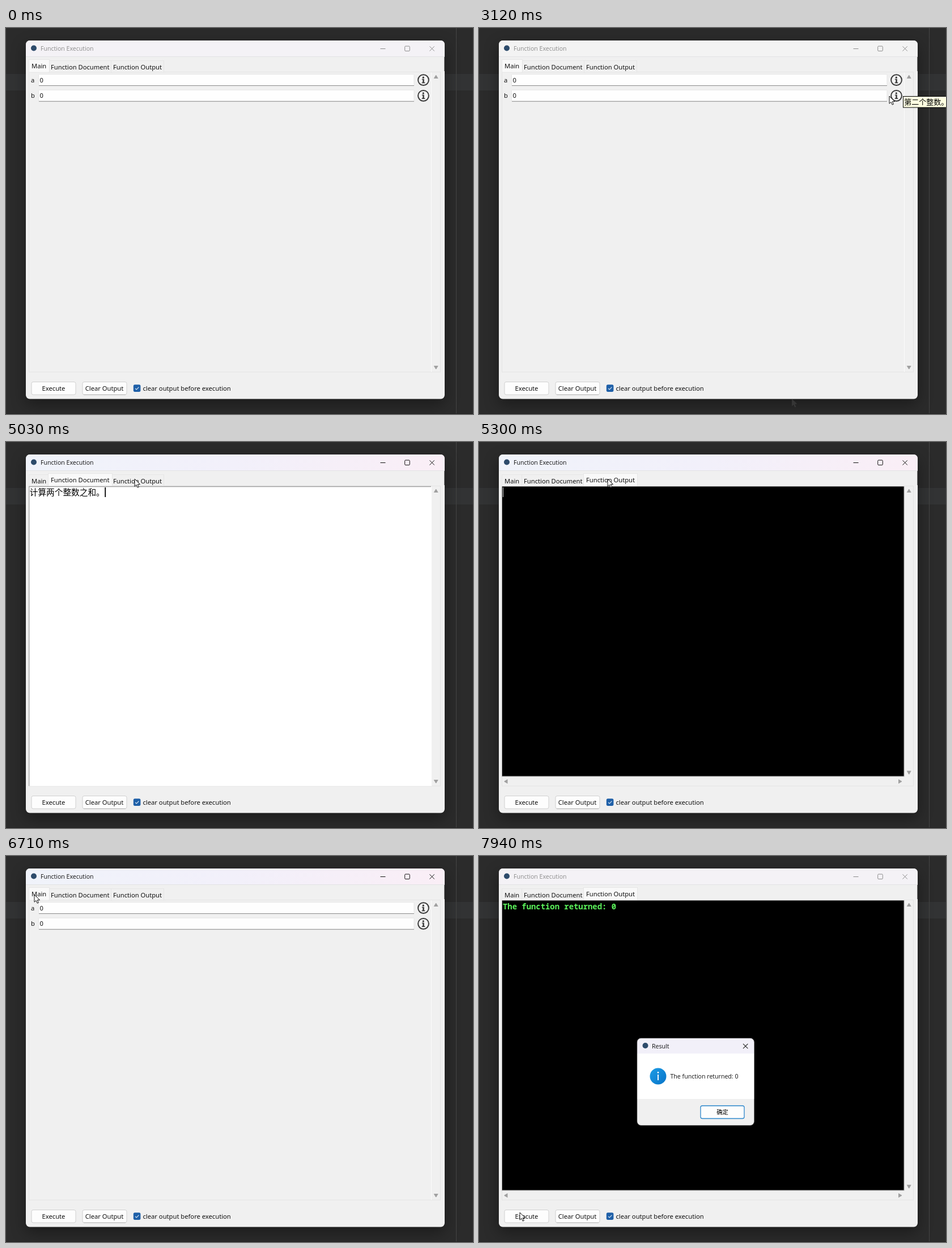
Recreate the animation shown at these times as an HTML page. Size 824 by 680 pixels, loop 8 s.

```html
<!DOCTYPE html>
<html lang="en">
<head>
<meta charset="utf-8">
<title>Function Execution</title>
<style>
html, body { margin: 0; width: 100%; height: 100%; overflow: hidden; background: #2b2b2b; }
svg { display: block; width: 824px; height: 680px; }
text { white-space: pre; }
.ui { font: 11.2px "Noto Sans", sans-serif; fill: #111; }
.cap { font: 10.6px "Open Sans", sans-serif; }
.cjk { font-family: "Noto Sans CJK SC", "Noto Sans CJK", sans-serif; fill: #000; }
.log { font: bold 13.9px "Noto Sans Mono", monospace; fill: #5cf45c; }
.win { filter: drop-shadow(0 9px 13px rgba(0, 0, 0, .38)); }
.arrow { fill: #a0a0a0; }
.line { fill: none; stroke: #e4e4e4; }
</style>
</head>
<body>
<svg viewBox="0 0 824 680">
  <defs>
    <linearGradient id="glow">
      <stop offset="0" stop-color="#f0f3fa"/>
      <stop offset=".5" stop-color="#f2f0fa"/>
      <stop offset="1" stop-color="#faeef6"/>
    </linearGradient>
    <linearGradient id="blue" x2="1" y2="1">
      <stop offset="0" stop-color="#1d9ce5"/>
      <stop offset="1" stop-color="#0874c8"/>
    </linearGradient>
    <path id="ptr" d="M0 0V13.2L3.1 10.4L5.2 15.2L7.4 14.2L5.3 9.6H9.5Z"/>
    <path id="up" class="arrow" d="M-4 3H4L.8 -2.6Q0 -3.6 -.8 -2.6Z"/>
    <g id="info">
      <circle r="9.4" fill="#f4f4f4" stroke="#3b3b3b" stroke-width="2"/>
      <circle cx="-.2" cy="-4.4" r="1.6" fill="#333"/>
      <path d="M-2.7 -1.8H1.2V4.2H2.8V5.6H-2.8V4.2H-1.2V-.5H-2.7Z" fill="#333"/>
    </g>
    <g id="entry">
      <rect x="57.5" y=".5" width="662.5" height="20" rx="1" fill="#fefefe" stroke="#e6e6e6"/>
      <path d="M58 20.5H720" stroke="#8a8a8a"/>
      <text class="ui" x="59.5" y="14.5">0</text>
      <use href="#info" x="736.5" y="10.6"/>
    </g>
    <clipPath id="frame"><rect x="35" y="22" width="739" height="631.5" rx="7"/></clipPath>
    <clipPath id="box"><rect x="279" y="321" width="206.5" height="153.5" rx="7"/></clipPath>
  </defs>

  <rect width="824" height="680" fill="#2b2b2b"/>
  <rect y="81" width="824" height="29" fill="#323334"/>
  <path d="M794.5 0V680" stroke="#454545"/>
  <path d="M0 679.5H824" stroke="#222"/>

  <rect class="win" x="35" y="22" width="739" height="631.5" rx="7" fill="#f0f0f0"/>
  <g clip-path="url(#frame)">
    <rect id="bar" x="35" y="22" width="739" height="28.5"/>
    <path d="M35 50.5H774" stroke="#e2e2e4"/>
    <path d="M773.5 51V76" stroke="#777"/>
  </g>
  <circle cx="49" cy="35.5" r="5" fill="#2d4b6b"/>
  <g id="head">
    <text class="cap" x="61" y="39.8" fill="currentColor">Function Execution</text>
    <path d="M660.5 36.5H669.5M747.5 32.3L755.8 40.6M755.8 32.3L747.5 40.6" stroke="currentColor"/>
    <rect x="703.7" y="32" width="8.6" height="8.6" rx="1.4" fill="none" stroke="currentColor"/>
  </g>

  <rect class="line" x="40.5" y="77.5" width="726" height="528.5"/>
  <g id="tabs"></g>

  <g id="main">
    <path d="M750.5 78V606" stroke="#fbfbfb"/>
    <text class="ui" x="44" y="95.5">a</text>
    <text class="ui" x="44" y="123">b</text>
    <use href="#entry" y="81"/>
    <use href="#entry" y="108.7"/>
  </g>
  <g id="doc">
    <rect x="40" y="78" width="711" height="528" fill="#fff"/>
    <path d="M40.7 606V78.5H750" fill="none" stroke="#a2a2a2" stroke-width="1.3"/>
    <text class="cjk" font-size="14.67" x="41.8" y="93.8">计算两个整数之和。</text>
  </g>
  <g id="out">
    <rect x="40" y="78" width="710.5" height="511.5" fill="#a8a8a8"/>
    <rect x="41" y="78.5" width="708.5" height="510" fill="#000"/>
    <use href="#up" transform="translate(47.5 598) rotate(-90)"/>
    <use href="#up" transform="translate(743 598) rotate(90)"/>
    <text id="log" class="log" x="42" y="94">The function returned: 0</text>
  </g>
  <rect id="caret" y="80" height="17"/>
  <use href="#up" x="758.7" y="86"/>
  <use href="#up" id="down"/>

  <rect id="exec" x="45" y="623.5" width="78" height="22.5" rx="3"/>
  <rect id="focus" x="47.5" y="626" width="73" height="17.5" fill="none" stroke="#4b7da3" stroke-dasharray="1 1"/>
  <rect x="135" y="623.5" width="78" height="22.5" rx="3" fill="#fdfdfd" stroke="#d0d0d0"/>
  <path d="M137 646H211" stroke="#bcbcbc"/>
  <text class="ui" x="84" y="638.7" text-anchor="middle">Execute</text>
  <text class="ui" x="173.5" y="638.7" text-anchor="middle">Clear Output</text>
  <rect x="224.8" y="628.3" width="12.6" height="12.6" rx="2.6" fill="#1f60a8"/>
  <path d="M228 634.8L230.2 637L234.4 632.6" fill="none" stroke="#d9e8f7" stroke-width="1.1"/>
  <text class="ui" x="241.5" y="638.7">clear output before execution</text>

  <g id="dialog">
    <rect class="win" x="279" y="321" width="206.5" height="153.5" rx="7" fill="#f0f0f0"/>
    <g clip-path="url(#box)">
      <rect x="279" y="321" width="207" height="27.5" fill="#f2f0f9"/>
      <rect x="279" y="348" width="207" height="80" fill="#fff"/>
    </g>
    <rect x="279" y="321" width="206.5" height="153.5" rx="7" fill="none" stroke="#777" stroke-opacity=".6"/>
    <circle cx="293.5" cy="334" r="5" fill="#2d4b6b"/>
    <text class="cap" x="305" y="338.5" fill="#111">Result</text>
    <path d="M466 330.8L474.4 339.2M474.4 330.8L466 339.2" stroke="#222" stroke-width="1.1"/>
    <circle cx="316" cy="388" r="14.5" fill="url(#blue)"/>
    <path d="M316 385V395" stroke="#fff" stroke-width="1.9"/>
    <circle cx="316" cy="381.4" r="1.4" fill="#fff"/>
    <text class="cap" x="337.5" y="391.8" fill="#111">The function returned: 0</text>
    <rect x="391" y="440" width="77" height="22.5" rx="3" fill="#fdfdfd" stroke="#2b86cb" stroke-width="1.3"/>
    <text class="cjk" x="429.5" y="455" font-size="10.3" font-weight="500" text-anchor="middle">确定</text>
  </g>

  <g id="tip">
    <rect x=".5" y=".5" width="90" height="19.5" fill="#ffffe1" stroke="#000"/>
    <text id="tipText" class="cjk" font-size="13" x="2.2" y="15"></text>
  </g>
  <use href="#ptr" id="trace" x="552" y="653" fill="#555" opacity=".4"/>
  <g id="cursor">
    <circle id="click" cx="1" cy="2" r="11.3" fill="#f2e91c" fill-opacity=".72"/>
    <use href="#ptr" fill="#fff" stroke="#111" stroke-width="1"/>
  </g>
</svg>
<script>
const LOOP = 8000;
const $ = id => document.getElementById(id);
const within = (t, spans) => spans.some(([a, b]) => t >= a && t < b);
const latest = (t, steps) => steps.filter(s => t >= s[0]).pop();
const show = (id, on) => $(id).style.display = on ? '' : 'none';
const set = (id, attrs) => {
  for (const k in attrs) $(id).setAttribute(k, attrs[k]);
};

const PAGES = [[0, 'main'], [4220, 'doc'], [5300, 'out'], [6710, 'main'], [7870, 'out']];
const CLICKS = [[4150, 4360], [5230, 5300], [6570, 6710], [7600, 7740]];
const CARET = [[4220, 4750], [5030, 5830], [6130, 6710]];
const HOVER = [[7540, 7870]];

// start, end, number of poses, points of a line or cubic curve
const MOVES = [
  [70, 840, 12, [[552, 653], [790, 520], [840, 150], [737, 87]]],
  [1840, 1980, 3, [[738, 95], [735, 111]]],
  [3120, 3890, 12, [[724, 120], [560, 640], [-20, 560], [103, 72]]],
  [4750, 5030, 5, [[110, 71], [227, 65]]],
  [5560, 5830, 4, [[222, 66], [172, 66]]],
  [6030, 6230, 4, [[150, 64], [30, 70], [10, 66], [50, 68]]],
  [6850, 7540, 11, [[50, 74], [62, 180], [78, 590], [72, 628]]]
];

// name, left, right, text x
const TABS = [
  ['main', 'Main', 40, 76, 45],
  ['doc', 'Function Document', 75, 186, 79],
  ['out', 'Function Output', 185, 278, 189]
];

function curve(p, u) {
  const v = 1 - u;
  const w = p.length === 2 ? [v, u] : [v * v * v, 3 * v * v * u, 3 * v * u * u, u * u * u];
  return [0, 1].map(i => p.reduce((sum, q, k) => sum + q[i] * w[k], 0));
}

function pointer(t) {
  const [a, b, n, path] = latest(t, MOVES);
  const k = Math.min(n - 1, Math.floor((t - a) / (b - a) * (n - 1) + 1e-6));
  return curve(path, k / (n - 1)).map(Math.round);
}

function drawTabs(page) {
  const tab = ([id, label, l, r, x]) => {
    const on = id === page;
    const grow = on && id !== 'main' ? 1 : 0;
    const top = on ? 55.5 : 57.5;
    return `<rect x="${l - grow + .5}" y="${top}" width="${r - l + 2 * grow}" height="${78 - top}"
      fill="${on ? '#f9f9f9' : '#f0f0f0'}" stroke="#e6e6e6"/>
      <text class="ui" x="${x}" y="${on ? 70.8 : 72.6}">${label}</text>`;
  };
  const order = [...TABS].sort((a, b) => (a[0] === page) - (b[0] === page));
  $('tabs').innerHTML = order.map(tab).join('');
}

let current;
function setPage(page) {
  if (page === current) return;
  current = page;
  drawTabs(page);
  for (const [id] of TABS) show(id, id === page);
  set('down', { transform: `translate(758.7 ${page === 'out' ? 582.3 : 598}) rotate(180)` });
  set('caret', page === 'doc'
    ? { x: 174.3, width: 1.8, fill: '#000' }
    : { x: 42, width: 1, fill: '#ddd' });
}

function render(t) {
  setPage(latest(t, PAGES)[1]);

  const active = within(t, [[4150, 7940]]);
  const tinted = t < 140 || t >= 7940;
  set('bar', { fill: active ? 'url(#glow)' : tinted ? '#f4f2f6' : '#f3f3f3' });
  $('head').style.color = active ? '#111' : '#8c8c8c';

  const hover = within(t, HOVER);
  set('exec', {
    fill: hover ? '#cce4f6' : '#fdfdfd',
    stroke: hover ? '#3d7db0' : '#d0d0d0',
    'stroke-width': hover ? 1.7 : 1
  });
  show('focus', hover);

  const first = t < 1840;
  show('tip', within(t, [[1240, 1840], [2450, 3190]]));
  set('tip', { transform: first ? 'translate(752 97)' : 'translate(748 120)' });
  $('tipText').textContent = first ? '第一个整数。' : '第二个整数。';

  show('caret', within(t, CARET));
  show('log', t >= 7870);
  show('dialog', t >= 7940);
  show('trace', within(t, [[140, 4150]]));
  show('click', within(t, CLICKS));
  show('cursor', t >= 70);
  if (t >= 70) set('cursor', { transform: `translate(${pointer(t)})` });
}

const start = performance.now();
function tick() {
  render((performance.now() - start) % LOOP);
  requestAnimationFrame(tick);
}
tick();
</script>
</body>
</html>
```
